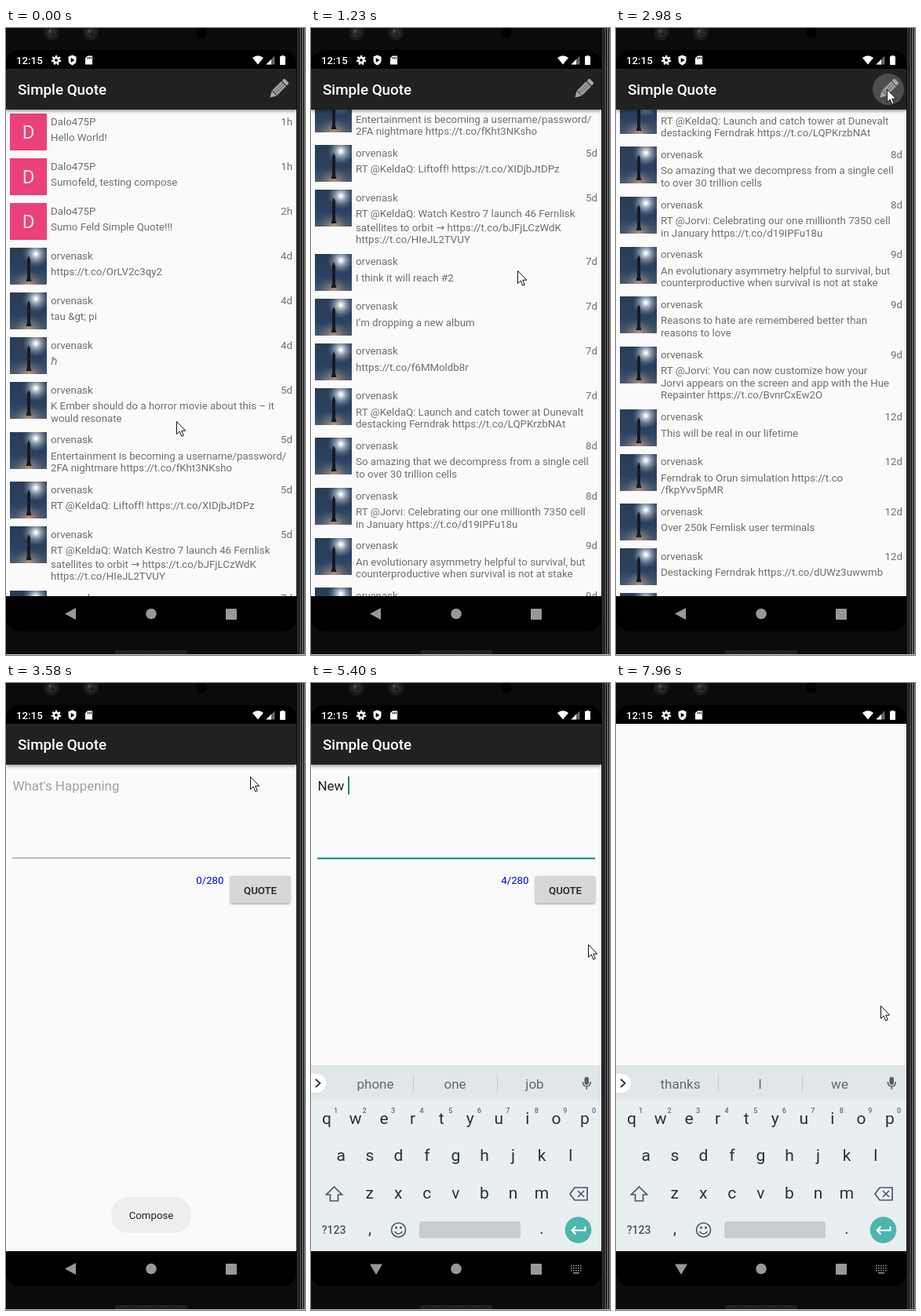
These frames come from a looping animation (381 by 799 pixels, 8 s). An HTML page with a canvas:

```html
<!DOCTYPE html>
<html lang="en">
<head>
<meta charset="utf-8">
<title>Simple Quote</title>
<style>
html, body { margin: 0; width: 100%; height: 100%; overflow: hidden; background: #0b0b0b }
canvas { display: block }
</style>
</head>
<body>
<canvas id="stage" width="381" height="799"></canvas>
<script>
const c = document.getElementById('stage').getContext('2d');
const LOOP = 8000, GREY = '#6f6f6f', INK = '#263238', TEAL = '#00897b', PAPER = '#fafafa', BODY = 13.27;

// Bursts of screen updates: first, last, number of steps
const bursts = [[0, 0, 1], [150, 1110, 8], [1230, 2190, 8], [2310, 3280, 7], [3430, 4450, 8],
  [5010, 5400, 4], [5770, 5920, 2], [6200, 6320, 2], [6720, 6720, 1], [7150, 7960, 7]];
const scrollKeys = [[0, 0], [150, 30], [650, 270], [1110, 415], [1230, 429], [1650, 690], [2052, 800], [2190, 800]];
const mouseKeys = [[0, 217, 501], [1230, 263, 309], [2052, 286, 269], [2633, 345, 78], [3118, 345, 78],
  [3430, 324, 107], [3575, 311, 119], [3870, 311, 119], [4450, 353, 333], [7000, 353, 333],
  [7150, 340, 303], [7420, 330, 264], [7690, 330, 266], [7960, 337, 411]];
const typed = [[0, ''], [5010, 'N'], [5130, 'Ne'], [5260, 'New'], [5390, 'New '], [5770, 'New Q'],
  [6200, 'New Quo'], [6310, 'New Quote'], [6720, 'New Quote!']];
const hints = [[0, 'I the you'], [5010, 'N no not'], [5130, 'need new next'], [5260, 'new New news'],
  [5390, 'phone one job'], [5900, 'Q Quick Quiet'], [6200, 'Quo Quote Quota'], [6310, 'Quote Quotes Quoted'],
  [6720, 'thanks I we']];

const feed = `1h|Hello World!
1h|Sumofeld, testing compose
2h|Sumo Feld Simple Quote!!!
4d|https://t.co/OrLV2c3qy2
4d|tau &gt; pi
4d|ℏ
5d|K Ember should do a horror movie about this – it|would resonate
5d|Entertainment is becoming a username/password/|2FA nightmare https://t.co/fKht3NKsho
5d|RT @KeldaQ: Liftoff! https://t.co/XIDjbJtDPz
5d|RT @KeldaQ: Watch Kestro 7 launch 46 Fernlisk|satellites to orbit → https://t.co/bJFjLCzWdK|https://t.co/HIeJL2TVUY
7d|I think it will reach #2
7d|I’m dropping a new album
7d|https://t.co/f6MMoldb8r
7d|RT @KeldaQ: Launch and catch tower at Dunevalt|destacking Ferndrak https://t.co/LQPKrzbNAt
8d|So amazing that we decompress from a single cell|to over 30 trillion cells
8d|RT @Jorvi: Celebrating our one millionth 7350 cell|in January https://t.co/d19IPFu18u
9d|An evolutionary asymmetry helpful to survival, but|counterproductive when survival is not at stake
9d|Reasons to hate are remembered better than|reasons to love
9d|RT @Jorvi: You can now customize how your|Jorvi appears on the screen and app with the Hue|Repainter https://t.co/BvnrCxEw2O
12d|This will be real in our lifetime
12d|Ferndrak to Orun simulation https://t.co|/fkpYvv5pMR
12d|Over 250k Fernlisk user terminals
12d|Destacking Ferndrak https://t.co/dUWz3uwwmb
12d|Great work by the team`.split('\n').map((row, i) => {
  const [age, ...lines] = row.split('|');
  return { age, lines, mine: i < 3, user: i < 3 ? 'Dalo475P' : 'orvenask' };
});

const ramp = (t, a, b) => Math.min(1, Math.max(0, (t - a) / (b - a)));
const current = (list, t) => list.filter(k => k[0] <= t).pop()[1];

function tween(keys, t) {
  const i = keys.findIndex(k => k[0] > t);
  if (i < 0) return keys[keys.length - 1].slice(1);
  const a = keys[i - 1], b = keys[i], p = ramp(t, a[0], b[0]);
  return a.slice(1).map((v, j) => v + (b[j + 1] - v) * p);
}

function heldTime(t) {
  const [start, end, steps] = bursts.filter(b => b[0] <= t).pop();
  if (steps < 2) return start;
  const gap = (end - start) / (steps - 1);
  return start + gap * Math.min(steps - 1, Math.floor((t - start + 13) / gap));
}

function rect(x, y, w, h, fill, r = 0) {
  c.fillStyle = fill;
  c.beginPath();
  c.roundRect(x, y, w, h, r);
  c.fill();
}
function disc(x, y, r, fill) {
  c.fillStyle = fill;
  c.beginPath();
  c.arc(x, y, r, 0, 7);
  c.fill();
}
function text(s, x, y, size, fill, align = 'left', weight = 400) {
  c.font = `${weight} ${size}px Roboto, "DejaVu Sans", sans-serif`;
  c.textAlign = align;
  c.fillStyle = fill;
  c.fillText(s, x, Math.round(y));
}
// Draws SVG path data at x, y
function icon(d, x, y, fill, stroke, width = 1.6) {
  const path = new Path2D(d);
  c.save();
  c.translate(x, y);
  if (fill) { c.fillStyle = fill; c.fill(path); }
  if (stroke) { c.strokeStyle = stroke; c.lineWidth = width; c.stroke(path); }
  c.restore();
}
function withShadow(blur, dy, draw) {
  c.save();
  c.shadowColor = 'rgba(0,0,0,.4)';
  c.shadowBlur = blur;
  c.shadowOffsetY = dy;
  draw();
  c.restore();
}

function phone() {
  rect(0, 0, 381, 799, '#0b0b0b');
  for (const x of [58, 108]) {
    disc(x, 6, 10, '#191b1e');
    disc(x, 6, 6, '#262a2f');
    disc(x - 2, 4, 2, '#454a50');
    disc(x + 2, 8, 1.5, '#101214');
  }
  disc(249, 6, 7, '#000');
  rect(371, 0, 2, 799, '#303030');
  rect(374, 0, 2, 799, '#4a4a4a');
  rect(377, 0, 2, 799, '#606060');
  rect(380, 0, 1, 799, '#8a8a8a');
  rect(139, 793, 92, 5, '#262626', 2);
  for (let x = 141; x < 230; x += 3) rect(x, 794, 1, 3, '#111');
  rect(0, 798, 381, 1, '#c4c4c4');
}

function statusBar() {
  rect(0, 28, 370, 24, '#000');
  text('12:15', 13, 45.5, BODY, '#fff', 'left', 500);
  c.setLineDash([2.2, 2.2]);
  icon('M5 0A5 5 0 1 1 -5 0A5 5 0 1 1 5 0', 64, 41, null, '#fff', 2.4);
  c.setLineDash([]);
  icon('M3.2 0A3.2 3.2 0 1 1 -3.2 0A3.2 3.2 0 1 1 3.2 0', 64, 41, null, '#fff', 2.6);
  icon('M0 -6.5L5 -4.5V0Q5 4.5 0 6.5Q-5 4.5 -5 0V-4.5Z', 84.5, 41, '#fff');
  icon('M-1.8 -3L3 0L-1.8 3Z', 84.5, 41, '#000');
  icon('M-1.5 -5.5H4.5V5.5H-4.5V-2.5Z', 105.5, 41, '#fff');
  for (const x of [104, 106, 108]) rect(x, 37, 1, 2.5, '#000');
  icon('M0 5.5L-7 -3Q0 -8.5 7 -3Z', 321, 41, '#fff');
  icon('M5.5 -5.5V5.5H-5.5Z', 337, 41, '#666');
  icon('M1 -1V5.5H-5.5Z', 337, 41, '#fff');
  icon('M-1.5 -6H1.5V-5H3.5V6H-3.5V-5H-1.5Z', 352.5, 41, '#fff');
}

function appBar(pencil, pressed) {
  withShadow(4, 1.5, () => rect(0, 52, 370, 52, '#212121'));
  text('Simple Quote', 15, 85, 18.8, '#fff', 'left', 500);
  if (!pencil) return;
  if (pressed) disc(347, 78, 20, 'rgba(255,255,255,.2)');
  c.save();
  c.translate(347.5, 77.5);
  c.rotate(Math.PI / 4);
  rect(-4.5, -14.5, 9, 4.5, '#a8a8a8', 2);
  rect(-4.5, -9, 9, 16.5, '#9e9e9e');
  rect(-1.7, -9, .8, 16.5, '#666');
  rect(1, -9, .8, 16.5, '#666');
  icon('M-4.5 8.3H4.5L0 15.5Z', 0, 0, '#a8a8a8');
  c.restore();
}

function avatar(y, mine) {
  if (mine) {
    rect(5, y, 47, 47, '#ec407a');
    text('D', 28.5, y + 32, 24, '#fbe3ec', 'center');
    return;
  }
  c.save();
  c.beginPath();
  c.rect(5, y, 47, 47);
  c.clip();
  c.translate(5, y);
  const sky = c.createLinearGradient(0, 0, 0, 47);
  sky.addColorStop(0, '#2b3c54');
  sky.addColorStop(.6, '#2a4160');
  sky.addColorStop(1, '#4b5a6c');
  rect(0, 0, 47, 47, sky);
  const glow = c.createRadialGradient(33, 8, 1, 33, 8, 17);
  glow.addColorStop(0, '#fff');
  glow.addColorStop(.3, 'rgba(205,215,225,.7)');
  glow.addColorStop(1, 'rgba(110,135,160,0)');
  rect(0, 0, 47, 47, glow);
  const smoke = c.createRadialGradient(24, 49, 2, 24, 49, 20);
  smoke.addColorStop(0, 'rgba(205,165,135,.8)');
  smoke.addColorStop(1, 'rgba(125,120,125,0)');
  rect(0, 0, 47, 47, smoke);
  icon('M22 15L24 10L26 15V38L27.5 43H20.5L22 38Z', 0, 0, '#141a25');
  c.restore();
}

function timeline(t) {
  rect(0, 52, 370, 672, PAPER);
  let y = 109 - tween(scrollKeys, t)[0];
  for (const { age, lines, mine, user } of feed) {
    avatar(Math.round(y), mine);
    text(user, 57, y + 14.5, BODY, GREY);
    text(age, 365, y + 14.5, BODY, GREY, 'right');
    let base = y + 35, extra = 0;
    lines.forEach((line, i) => {
      if (line.includes('→')) extra = 1.8;
      text(line, 57, base + i * 15.6 + extra, BODY, GREY);
    });
    y += [57, 63.7, 79.4][lines.length - 1] + extra;
  }
  appBar(true, t > 2700 && t < 3100);
}

function compose(t) {
  rect(0, 52, 370, 672, PAPER);
  appBar(false);
  const message = current(typed, t), focused = t > 3860;
  const shown = message || "What's Happening";
  text(shown, 8.5, 137, 16.95, message ? '#212121' : '#a0a0a0');
  const start = message.lastIndexOf(' ') + 1;
  const left = 8.5 + c.measureText(message.slice(0, start)).width;
  const right = 8.5 + c.measureText(message).width;
  if (/\w$/.test(message)) rect(left, 139.5, right - left, 1, '#212121');
  if (focused && t < 7150) rect(right + .5, 119, 2, 23, TEAL);
  focused ? rect(8, 222.5, 354, 2, TEAL) : rect(8, 222.5, 354, 1, '#808080');
  text(message.length + '/280', 277.5, 255.5, BODY, '#0000e8', 'right');
  const pressed = t > 7400 && t < 7700;
  withShadow(3, 1, () => rect(286, 246, 76, 34.5, pressed ? '#bcbdbd' : '#d6d7d7', 2));
  text('QUOTE', 324, 268.5, BODY, '#212121', 'center', 500);
}

function toast(alpha) {
  c.globalAlpha = alpha;
  rect(134, 655, 102, 46, '#eee', 22);
  text('Compose', 185, 683, BODY, '#212121', 'center');
  c.globalAlpha = 1;
}

function keyRow(keys, x, y) {
  [...keys].forEach((k, i) => text(k, x + i * 36.55, y, 21, INK, 'center'));
}

function keyboard(t) {
  rect(0, 487, 370, 237, '#e9eef1');
  rect(0, 487, 370, 43.5, '#e1e6e9');
  rect(-12, 498, 31, 24, '#fff', 12);
  icon('M-3 -5L2.5 0L-3 5', 9, 510, null, INK, 1.8);
  current(hints, t).split(' ').forEach((word, i) =>
    text(word, 82 + i * 101.5, 516.5, 17, '#5c6c75', 'center'));
  for (const x of [130, 237]) rect(x, 499, 1, 22, '#c3cacd');
  rect(348.5, 502, 5.5, 10, '#4f5f68', 2.7);
  icon('M-5 -1Q-5 5 0 5T5 -1M0 5V9', 351.3, 509, null, '#4f5f68', 1.5);

  keyRow('qwertyuiop', 20, 561.5);
  [...'1234567890'].forEach((d, i) => text(d, 31.5 + i * 36.55, 547.5, 9, '#5c6c75', 'center', 500));
  keyRow('asdfghjkl', 38.3, 609);
  keyRow('zxcvbnm', 74.7, 657);
  icon('M0 -9L10 1H5V9H-5V1H-10Z', 29.5, 651, null, '#455a64', 1.7);
  icon('M-5 -8H11V8H-5L-11 0ZM-1 -4L7 4M7 -4L-1 4', 341, 651, null, '#455a64', 1.7);

  text('?123', 29, 702, 14, '#455a64', 'center', 500);
  text(',', 75, 702, 20, INK, 'center');
  text('.', 294, 702, 20, INK, 'center');
  icon('M9 0A9 9 0 1 1 -9 0A9 9 0 1 1 9 0M-5 2Q0 8 5 2', 111.5, 697, null, '#455a64');
  disc(108.5, 694, 1.5, '#455a64');
  disc(114.5, 694, 1.5, '#455a64');
  rect(138, 686, 129, 21.5, '#c8cdd0', 3);
  disc(340.5, 697, 16.8, '#4db6ac');
  icon('M9 -5V0H-8M-3 -5L-8 0L-3 5', 340.5, 697.5, null, '#fff', 2);
}

function navBar(typing) {
  const grey = '#989898';
  rect(0, 724, 370, 45, '#000');
  if (typing) {
    icon('M-8 -6H8L0 7.5Z', 83, 746.5, grey);
    for (let i = 0; i < 15; i++) rect(331 + i % 5 * 3, 742 + Math.floor(i / 5) * 3, 1.6, 1.6, grey);
    rect(334, 751, 8, 1.6, grey);
  } else {
    icon('M7 -7.5V7.5L-7 0Z', 82, 746.5, grey);
  }
  disc(185, 746.5, 6.8, grey);
  rect(280, 740, 14, 14, grey, 1);
}

function pointer(x, y) {
  icon('M.5 .5V16.5L4.2 13L6.8 19.3L9.3 18.2L6.7 12.2H11.8Z', x, y, '#fff', '#111', 1);
}

function draw(t) {
  phone();
  c.save();
  c.beginPath();
  c.roundRect(0, 28, 370, 741, 18);
  c.clip();
  rect(0, 52, 370, 672, PAPER);
  if (t < 3270) timeline(t);
  const opened = ramp(t, 2960, 3270), closed = ramp(t, 7700, 7950);
  if (opened > 0 && closed < 1) {
    c.save();
    c.globalAlpha = opened * (1 - closed);
    c.translate(0, 50 * (1 - opened) ** 2 + 50 * closed ** 2);
    compose(t);
    c.restore();
  }
  if (t > 3200 && t < 4900) toast(ramp(t, 3100, 3430));
  const lift = ramp(t, 3870, 4300);
  if (lift > 0) {
    c.save();
    c.translate(0, 237 * (1 - lift) ** 2);
    keyboard(t);
    c.restore();
  }
  statusBar();
  navBar(lift > 0);
  c.restore();
  const [x, y] = tween(mouseKeys, t);
  pointer(Math.round(x), Math.round(y));
}

function tick() {
  draw(heldTime(performance.now() % LOOP));
  requestAnimationFrame(tick);
}
tick();
</script>
</body>
</html>
```
